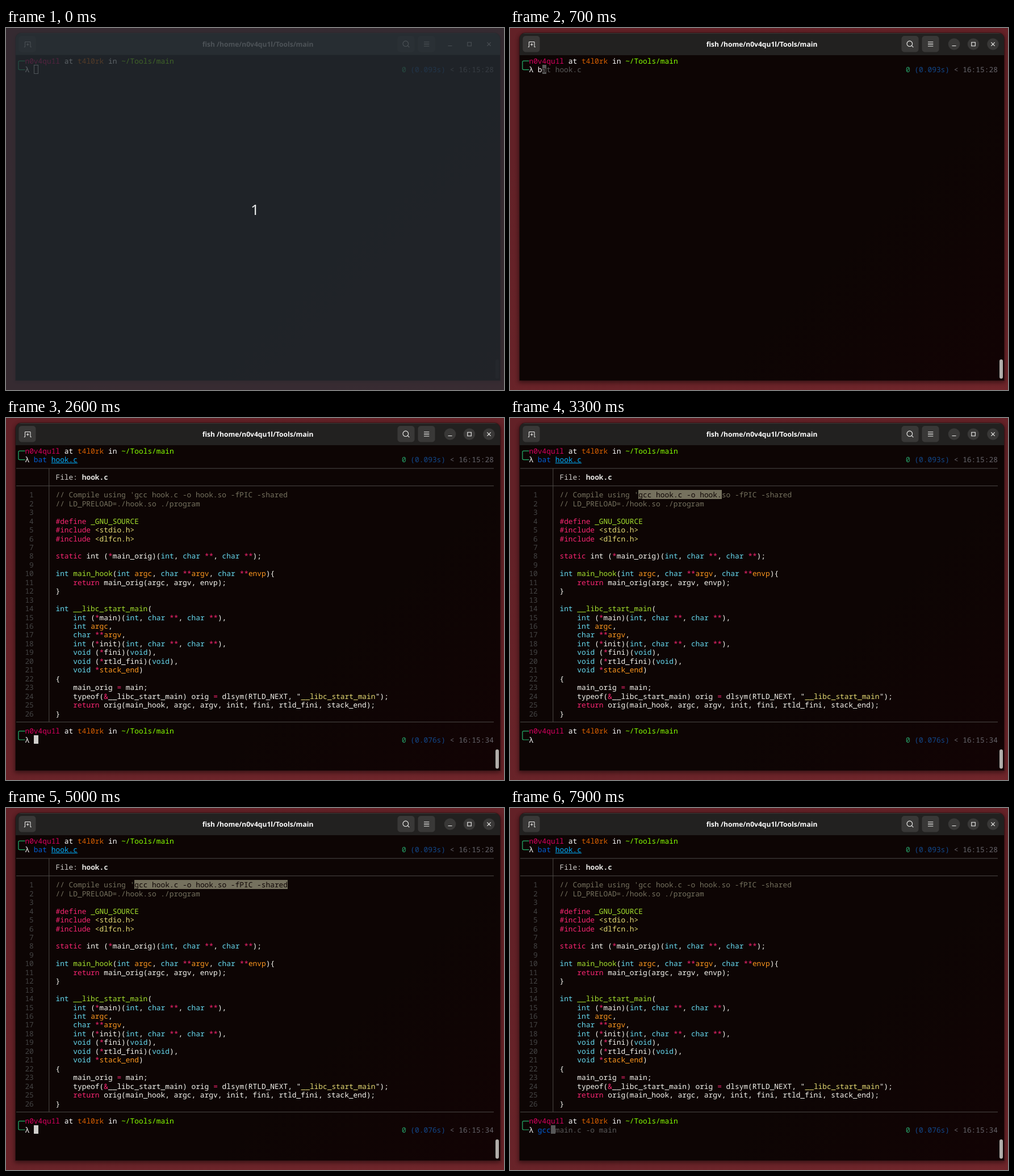
These frames come from a looping animation (877x639 px, 8 s). An HTML page:

```html
<!DOCTYPE html>
<html lang="en">
<head>
<meta charset="utf-8">
<title>Terminal</title>
<style>
html, body { margin: 0; width: 100%; height: 100%; overflow: hidden; }
body { position: relative; background: linear-gradient(150deg, #622127 20%, #70262b); }
#win { position: absolute; left: 17px; top: 9px; width: 853px; height: 613px; border-radius: 10px 10px 0 0;
  overflow: hidden; background: linear-gradient(135deg, #0d0504 65%, #120304); }
#shade { position: absolute; left: 17px; top: 9px; width: 853px; height: 613px; border-radius: 10px 10px 0 0;
  box-shadow: 0 0 0 1px rgba(0,0,0,.3), 0 2px 6px 2px rgba(0,0,0,.2),
    0 3px 9px 1px rgba(0,0,0,calc(.3 * var(--focus))); }
#bar { position: absolute; left: 0; top: 0; width: 100%; height: 39px; background: #2d2c2b;
  box-shadow: inset 0 1px #3a3938, inset 0 -1px #1b1a19; }
#bar::before { content: ""; position: absolute; inset: 1px 0 0; background: #222120; opacity: var(--focus); }
#title { position: absolute; left: 0; width: 887px; top: 18.6px; text-align: center; color: #fff;
  font: 700 12.05px/20px "Open Sans", "Noto Sans", sans-serif; white-space: pre; text-rendering: geometricPrecision; }
#title, .icon { opacity: calc(.7 + .3 * var(--focus)); }
#ui { position: absolute; left: 0; top: 0; }
#ui .round { opacity: var(--focus); }
#thumb { position: absolute; left: 862px; top: 585px; width: 5.5px; height: 34px; border-radius: 3px;
  background: #b8b5b1; opacity: calc(.09 + .87 * var(--focus)); }
#term { position: absolute; left: 18px; top: 50px;
  font: 12.858px/17px "Noto Sans Mono", "DejaVu Sans Mono", monospace; text-rendering: geometricPrecision; }
#term span { position: absolute; height: 15.45px; white-space: pre; }
#cursor { position: absolute; box-sizing: border-box; width: 8px; height: 15.5px; }
#dim { position: absolute; inset: 0; background: rgba(38,46,52,.75); }
#count { position: absolute; left: 0; width: 877px; top: 299.5px; text-align: center; color: #e6e8e8;
  font: 26px/40px "Noto Sans", "Open Sans", sans-serif; }
</style>
</head>
<body>
<div id="shade"></div>
<div id="win"><div id="bar"></div></div>
<div id="title"></div>
<div id="thumb"></div>
<div id="term"></div>
<svg id="ui" width="877" height="639" fill="none">
  <g fill="#393837">
    <rect x="22.500" y="14" width="30" height="28.500" rx="5"/>
    <rect x="689.500" y="14" width="30" height="28.500" rx="5"/>
    <rect x="725.500" y="14" width="30" height="28.500" rx="5"/>
    <g class="round"><circle cx="782" cy="28.500" r="10.300"/><circle cx="816" cy="28.500" r="10.300"/><circle cx="850.500" cy="28.500" r="10.300"/></g>
  </g>
  <g class="icon" stroke="#f4f4f2" stroke-width="1.100">
    <path d="M31.800 33.500h1.700v-9h9.500v9h1.700M38.200 26.800v4.600M36 29.100h4.500" stroke-width="1"/>
    <circle cx="703.800" cy="27.700" r="4.800"/><path d="M707.300 31.200l3 3"/>
    <path d="M736 24.700h9.300M736 28.400h9.300M736 32h9.300M778.500 31.500h7M812.800 25.300h6.500v6.500h-6.500zM847.300 25.300l6.400 6.400M853.700 25.300l-6.400 6.400"/>
  </g>
  <g id="prompts" stroke="#26b36e" stroke-width="1.200"></g>
  <path id="grid" stroke="#4d4a48" d="M18 89H859M18 119.800H859M18 536.700H859M75.800 89V536.700"/>
</svg>
<div id="cursor"></div>
<div id="dim"><div id="count">1</div></div>
<script>
const LOOP = 8000, CW = 7.715, RH = 15.45, COLS = 109, BG = '#0e0504';
const $ = id => document.getElementById(id);
const colors = {
  w: '#f8f8f2', d: '#d0cfcc', p: '#f92672', b: '#66d9ef', g: '#a6e22e', o: '#fd971f', y: '#e6db74',
  c: '#75715e', n: '#444444', U: '#d7005f', H: '#d75f00', D: '#87ff00', W: '#ffffff', G: '#26a269',
  S: '#12488b', T: '#66646a', C: '#005fd7', F: '#00afff', B: '#e4e3e0', s: '#585858'
};

// A mark such as ~p sets the colour of the text after it.
const code = `~c// Compile using 'gcc hook.c -o hook.so -fPIC -shared
~c// LD_PRELOAD=./hook.so ./program

~p#define ~g_GNU_SOURCE
~p#include ~y<stdio.h>
~p#include ~y<dlfcn.h>

~pstatic~w int (~p*~wmain_orig)(~bint~w, ~bchar ~p**~w, ~bchar ~p**~w);

~bint ~gmain_hook~w(~bint ~oargc~w, ~bchar ~p**~oargv~w, ~bchar ~p**~oenvp~w){
    ~preturn~w main_orig(argc, argv, envp);
~w}

~bint ~g__libc_start_main~w(
    ~bint ~w(~p*~wmain)(~bint~w, ~bchar ~p**~w, ~bchar ~p**~w),
    ~bint ~oargc~w,
    ~bchar ~p**~oargv~w,
    ~bint ~w(~p*~winit)(~bint~w, ~bchar ~p**~w, ~bchar ~p**~w),
    ~bvoid ~w(~p*~wfini)(~bvoid~w),
    ~bvoid ~w(~p*~wrtld_fini)(~bvoid~w),
    ~bvoid ~p*~ostack_end~w)
~w{
    ~wmain_orig ~p=~w main;
    ~wtypeof(~p&~w__libc_start_main) orig ~p=~w dlsym(RTLD_NEXT, "~y__libc_start_main~w");
    ~preturn~w orig(main_hook, argc, argv, init, fini, rtld_fini, stack_end);
~w}`.split('\n');

const user = 'n0v4qu1l', host = 't4l0rk', cwd = '/Tools/main';
const head = `  ~U${user}~W at ~H${host}~W in ~D\u223c${cwd}`;
const path = ` /home/${user}${cwd}`;

// Each step changes part of the state from its time on.
const steps = [
  [0, { dim: 1, focus: 0, title: 'fish', cmd: '', cur: [1, 4], on: 1, out: 0, sel: null }],
  [100, { dim: 0 }],
  [300, { focus: .4 }],
  [400, { focus: .8 }],
  [500, { focus: 1 }],
  [700, { cmd: '~Wb~sat hook.c', cur: [1, 5, 'a'] }],
  [900, { cmd: '~Cbat~s hook.c', cur: [1, 7, ' '] }],
  [1200, { cmd: '~Cbat ~Fhook.c', cur: [1, 14] }],
  [1500, { title: 'bat hook.c', cur: [2, 0] }],
  [1600, { title: 'fish', out: 1, cmd2: '', cur: [33, 4] }],
  [2000, { on: 0 }],
  [2600, { on: 1 }],
  [3200, { on: 0, sel: [5, 33] }],
  [3300, { sel: [5, 46] }],
  [3400, { sel: [6, 52] }],
  [3700, { sel: [5, 54] }],
  [3800, { on: 1, sel: [5, 60] }],
  [3900, { sel: [5, COLS] }],
  [4400, { on: 0 }],
  [4500, { sel: [5, 62] }],
  [5000, { on: 1 }],
  [5700, { on: 0 }],
  [5800, { sel: null }],
  [6400, { on: 1 }],
  [6900, { on: 0 }],
  [7500, { on: 1, cmd2: '~Wg', cur: [33, 5] }],
  [7600, { cmd2: '~Cg~scc main.c -o main', cur: [33, 5, 'c'] }],
  [7700, { cmd2: '~Cgc~sc main.c -o main', cur: [33, 6, 'c'] }],
  [7900, { cmd2: '~Cgcc~s main.c -o main', cur: [33, 7, ' '] }]
];

function span(row, col, text, key, inverse) {
  const el = document.createElement('span'), s = el.style;
  el.textContent = text;
  s.left = col * CW + 'px';
  s.top = row * RH + 'px';
  s.color = inverse ? BG : colors[key];
  if (inverse) { s.background = colors[key]; s.width = text.length * CW + 'px'; }
  if (key === 'F') s.textDecoration = 'underline';
  if (key === 'B') s.fontWeight = 700;
  $('term').append(el);
}

function line(row, col, marked, from = COLS, to = COLS) {
  let key = 'd', cells = [];
  marked.split(/~(\w)/).forEach((part, i) => {
    if (i % 2) key = part;
    else for (const ch of part) cells.push([ch, key]);
  });
  while (to > from && cells.length + col < to) cells.push([' ', 'd']);
  for (let i = 0; i < cells.length;) {
    const inside = k => k + col >= from && k + col < to;
    let j = i, text = '';
    while (j < cells.length && cells[j][1] === cells[i][1] && inside(j) === inside(i)) text += cells[j++][0];
    span(row, col + i, text, cells[i][1], inside(i));
    i = j;
  }
}

function prompt(row, cmd, secs, clock) {
  line(row, 0, head);
  line(row + 1, 2, '~Wλ ' + cmd);
  line(row + 1, 88, `~G0 ~S(${secs}s)~T < ${clock}`);
  const y = 50.4 + (row + .5) * RH;
  return `<path d="M33.500 ${y}H24q-2 0-2 2v${RH - 4}q0 2 2 2h9.500"/>`;
}

function listing(sel) {
  line(3, 9, '~dFile: ~Bhook.c');
  code.forEach((text, i) => {
    const row = i + 5, hit = sel && row <= sel[0];
    const from = hit ? (row === 5 ? 27 : 0) : COLS;
    const to = hit && row === sel[0] ? sel[1] : COLS;
    line(row, 0, '~n' + String(i + 1).padStart(4) + '     ' + text, from, to);
  });
}

function render(s) {
  document.body.style.setProperty('--focus', s.focus);
  $('dim').style.display = s.dim ? '' : 'none';
  $('grid').style.display = s.out ? '' : 'none';
  $('title').textContent = s.title + path;
  $('term').textContent = '';
  let marks = prompt(0, s.cmd, '0.093', '16:15:28');
  if (s.out) {
    listing(s.sel);
    marks += prompt(32, s.cmd2, '0.076', '16:15:34');
  }
  $('prompts').innerHTML = marks;

  const [row, col, under] = s.cur, c = $('cursor').style, fill = under ? colors.s : colors.d;
  c.left = 18 + col * CW + 'px';
  c.top = 50 + row * RH + 'px';
  c.display = s.on && !under ? '' : 'none';
  c.background = s.focus ? fill : 'none';
  c.border = s.focus ? 'none' : '1px solid ' + fill;
  if (under) span(row, col, under, 's', true);
}

let shown = 0;
function tick(now) {
  const t = now % LOOP, past = steps.filter(([at]) => at <= t);
  if (past.length !== shown) {
    shown = past.length;
    render(Object.assign({}, ...past.map(p => p[1])));
  }
  requestAnimationFrame(tick);
}
tick(performance.now());
</script>
</body>
</html>
```
